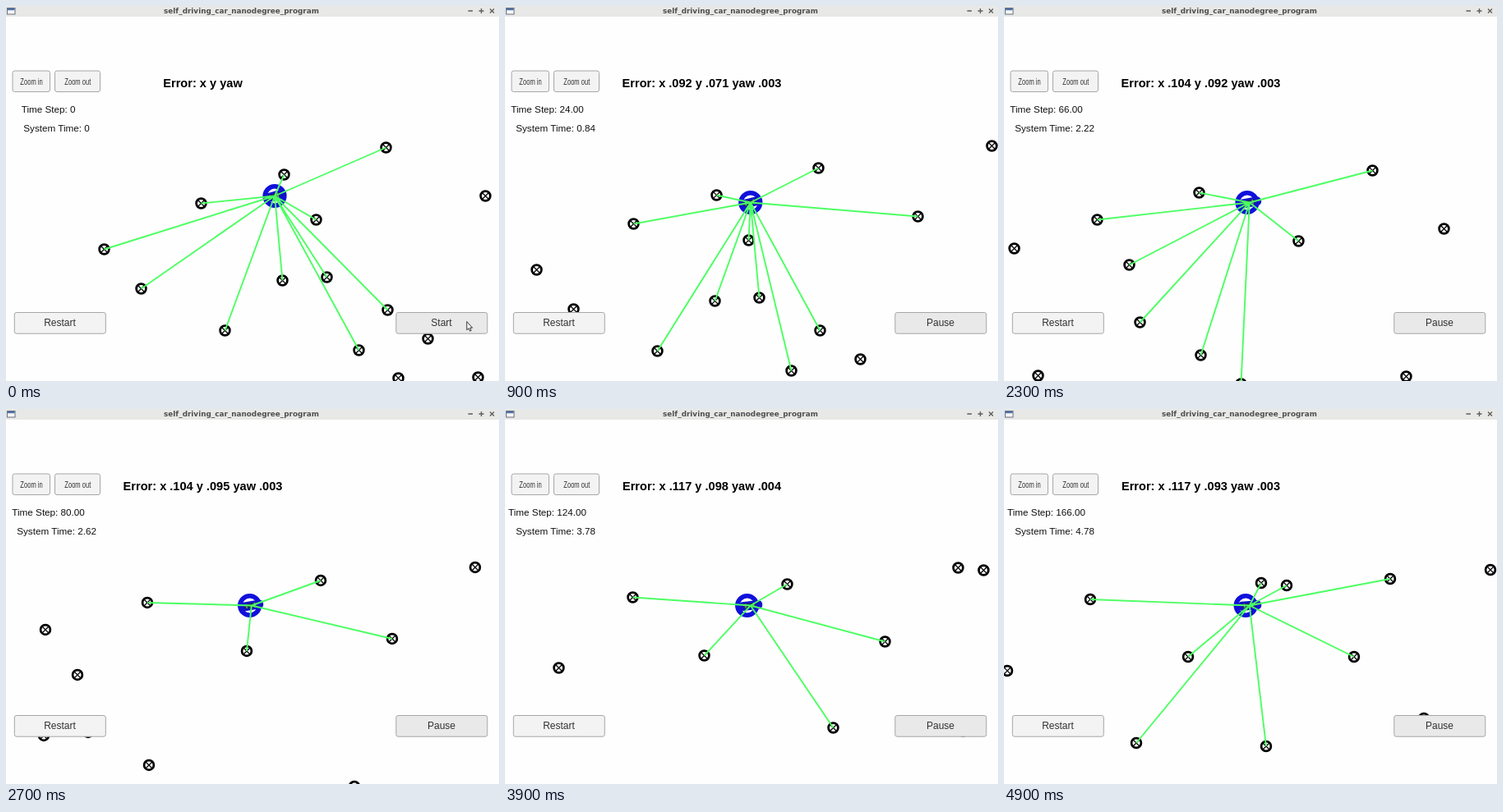
Recreate the animation shown at these times as an HTML page. Size 600x457 px, loop 5000 ms.

```html
<!DOCTYPE html>
<html lang="en">
<head>
<meta charset="utf-8">
<title>Particle filter simulator</title>
<style>
html, body { margin: 0; width: 100%; height: 100%; overflow: hidden; background: #fefefe; }
svg { display: block; }
text { font-family: "Liberation Sans", Arial, sans-serif; text-anchor: middle; }
.btn rect { fill: #f3f3f3; stroke: #a6a6a6; rx: 2.5px; }
.btn .hover { fill: #e9e9e9; }
.btn text { font-size: 12px; fill: #323232; }
.btn .small { font-size: 10.8px; }
.info { font-size: 11.7px; fill: #111; }
</style>
</head>
<body>
<svg width="100%" height="100%" viewBox="0 0 600 457">
  <defs>
    <g id="mark" fill="none" stroke="#000">
      <circle r="5.9" stroke-width="2.7"/>
      <path d="M-4-4L4 4M-4 4L4-4" stroke-width="1.2"/>
    </g>
    <g id="car">
      <rect x="-14.5" y="-5.5" width="29" height="11" rx="5" fill="#1212cc"/>
      <rect x="-9" y="-3" width="16" height="6" rx="2" fill="#1c2c58"/>
      <path d="M-6-2.5V2.5M4-3V3" stroke="#7d96a8" stroke-width="1.4"/>
    </g>
  </defs>
  <rect width="600" height="457" fill="#fefefe"/>
  <g id="marks"></g>
  <circle id="ring" r="11.8" fill="#fff" stroke="#1010dc" stroke-width="5.6"/>
  <use id="body" href="#car"/>
  <path id="rays" fill="none" stroke="#4cff62" stroke-width="1.9"/>

  <rect width="600" height="13" fill="#e8e8e7"/>
  <rect x="1.5" y="2.5" width="9.5" height="7.5" fill="#f6f6f6" stroke="#69717c"/>
  <rect x="2" y="3" width="8.5" height="2.2" fill="#4d70a8"/>
  <text x="286.5" y="9" style="font:bold 8.85px 'DejaVu Sans',sans-serif" fill="#4f4f4f">self_driving_car_nanodegree_program</text>
  <path d="M562.5 6H568M575.5 6H581.5M578.5 3V9M589 3.5L594 8.5M589 8.5L594 3.5" fill="none" stroke="#5c5c5c" stroke-width="1.3"/>

  <g class="btn">
    <rect x="8" y="79" width="45.5" height="25.5"/>
    <text class="small" transform="translate(31 95.8) scale(.7 1)">Zoom in</text>
    <rect x="59.5" y="79" width="55" height="25.5"/>
    <text class="small" transform="translate(87.3 95.8) scale(.7 1)">Zoom out</text>
    <rect x="10.3" y="373.5" width="111" height="25.7"/>
    <text x="65.5" y="390.4">Restart</text>
    <rect class="hover" x="474.8" y="373.5" width="111" height="25.7"/>
    <text id="run" x="530" y="390.4"></text>
  </g>
  <text id="error" x="239.5" y="98.7" font-size="14.6" font-weight="bold"></text>
  <text id="step" class="info" x="51.6" y="130.4"></text>
  <text id="clock" class="info" x="61.6" y="152.9"></text>
  <path id="pointer" d="M560.8 384.5V394.8L563 392.8L564.6 396.2L566.2 395.5L564.7 392.2H567.6Z" fill="#f4f4f4" stroke="#222" stroke-width=".9"/>
</svg>
<script>
const LOOP = 5, TICK = .1, RANGE = 225;
const $ = id => document.getElementById(id);

// landmark map, in pixels of the first view
const map = [
  [338, 205], [462, 172], [237, 240], [377, 260], [119, 296], [164, 344], [336, 334],
  [390, 330], [464, 370], [266, 395], [429, 419], [513, 405], [583, 231], [477, 453],
  [574, 452], [673, 145], [714, 396], [760, 216], [861, 129], [980, 199], [917, 304],
  [1069, 109], [1100, 112], [1226, 104], [1348, 93], [1182, 199], [1075, 308], [1267, 274]
];

// drive: seconds, camera x, camera y, time step
const drive = [
  [0, 28, 7, 0], [.9, 81, 25, 24], [1.5, 136.5, 39, 42], [2.3, 225, 55, 66],
  [3.2, 384, 73.5, 100], [3.9, 518, 84, 124], [4.9, 756.5, 102.5, 166]
];

// quadratic through three neighbouring points
function parabola(i, t, c) {
  const three = drive.slice(i, i + 3);
  return three.reduce((sum, p) => sum + three.reduce(
    (part, q) => q === p ? part : part * (t - q[0]) / (p[0] - q[0]), p[c]), 0);
}

// blend the parabolas on both sides into one smooth curve
function along(t, c) {
  const last = drive.length - 3;
  let i = 0;
  while (i <= last && t >= drive[i + 1][0]) i++;
  const u = (t - drive[i][0]) / (drive[i + 1][0] - drive[i][0]);
  const before = parabola(Math.max(0, i - 1), t, c);
  const after = parabola(Math.min(last, i), t, c);
  return before + (after - before) * u;
}

const wave = (t, peak, period) => Math.cos(2 * Math.PI * (t - peak) / period);
const errorX = t => .085 + .007 * t + .0013 * t * wave(t, .85, 1.5);
const errorY = t => .0985 - .0035 * (t - 3.7) ** 2;
const errorYaw = t => .0034 + .0003 * wave(t, 1.5, 2.4);
const ringLag = t => 1.3 * t * Math.abs(Math.sin(Math.PI * (t - .9) / 2.3));

const decimal = v => v.toFixed(3).slice(1);
const even = v => 2 * Math.round(v / 2);

function drawScene(ox, oy, cx, cy, lag, angle) {
  let dots = '', rays = '';
  for (const [mx, my] of map) {
    const x = mx + .5 + ox, y = my + .5 + oy;
    dots += `<use href="#mark" x="${x}" y="${y}"/>`;
    if (Math.hypot(x - cx, y - cy) < RANGE) rays += `M${cx} ${cy}L${x} ${y}`;
  }
  $('marks').innerHTML = dots;
  $('rays').setAttribute('d', rays);
  $('ring').setAttribute('cx', cx - lag);
  $('ring').setAttribute('cy', cy);
  $('body').setAttribute('transform', `translate(${cx} ${cy}) rotate(${angle})`);
}

function setLabels(run, error, step, clock) {
  $('run').textContent = run;
  $('error').textContent = 'Error: ' + error;
  $('step').textContent = 'Time Step: ' + step;
  $('clock').textContent = 'System Time: ' + clock;
}

function draw(t) {
  const idle = t < TICK;
  $('pointer').style.display = idle ? '' : 'none';
  if (idle) {
    drawScene(0, 0, 327, 231.5, 0, -16);
    setLabels('Start', 'x y yaw', 0, 0);
    return;
  }
  drawScene(-along(t, 1), along(t, 2), 298.8, 239.5, ringLag(t), -16 + 2.4 * t);
  const clock = even(100 * (.982 * t - .04)) / 100;
  setLabels('Pause',
    `x ${decimal(errorX(t))} y ${decimal(errorY(t))} yaw ${decimal(errorYaw(t))}`,
    even(along(t, 3)).toFixed(2), clock.toFixed(2));
}

let shown = -1;
const start = performance.now();
function frame() {
  const tick = Math.floor((performance.now() - start) / 1000 % LOOP / TICK);
  if (tick !== shown) draw((shown = tick) * TICK);
  requestAnimationFrame(frame);
}
frame();
</script>
</body>
</html>
```
